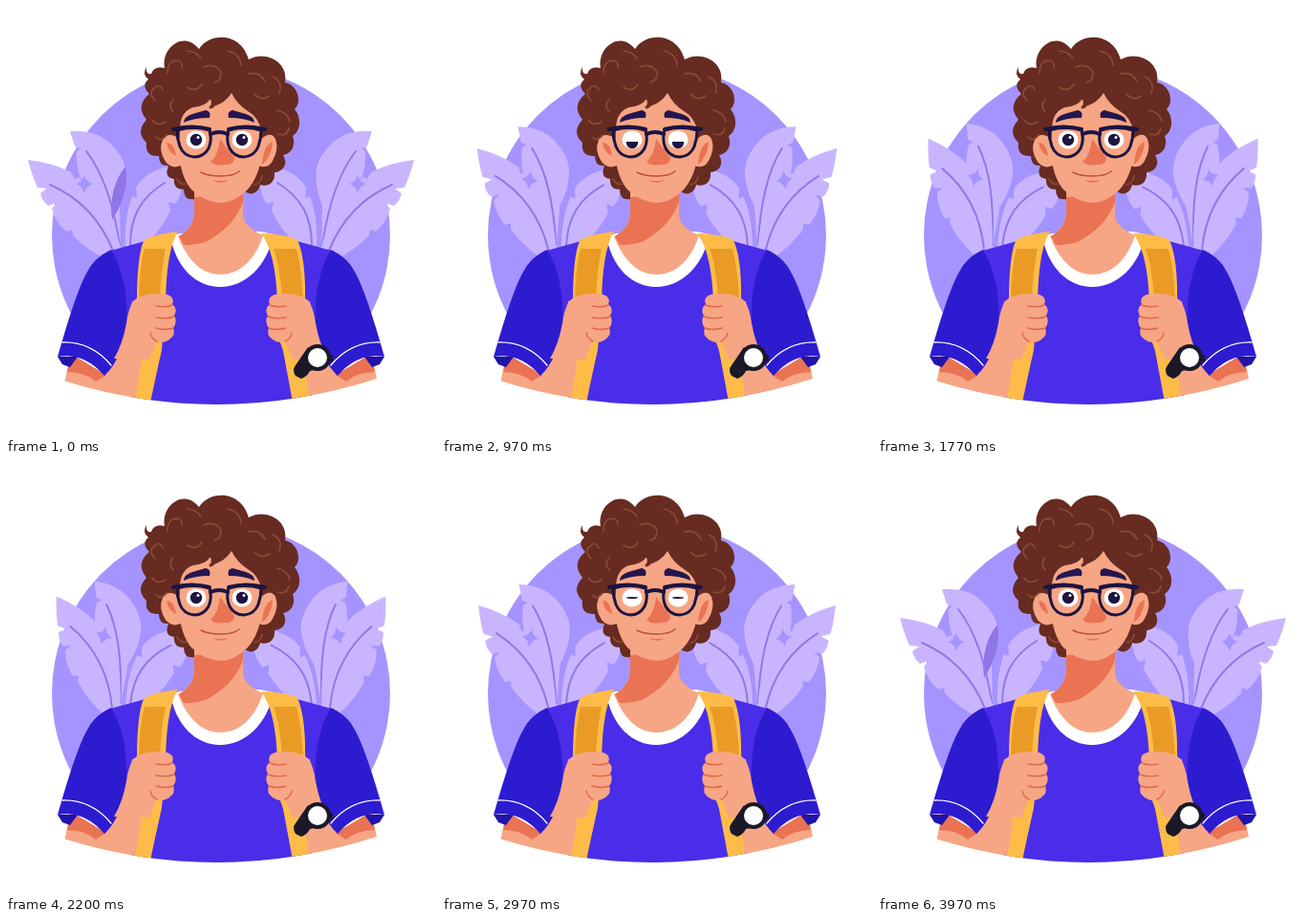
An HTML page that plays this animation: 450 by 450 pixels, repeating every 4000 ms.

```html
<!DOCTYPE html>
<html lang="en">
<head>
<meta charset="utf-8">
<title>Student with backpack</title>
<style>
html, body { margin: 0; width: 100%; height: 100%; overflow: hidden; background: #fff; }
svg { display: block; width: 100vw; height: 100vh; }
.line { fill: none; stroke-linecap: round; stroke-linejoin: round; }
.frond { fill: #c9b5ff; }
.stem { stroke: #9377ea; stroke-width: 2; }
.crease { stroke: #e2684b; stroke-width: 1.5; }
.curl { stroke: #8b4b36; stroke-width: 1.6; }
.hair { fill: #672b21; }
.skin { fill: #f6a684; }
.shade { fill: #ea7354; }
.sleeve { fill: #2d1bd0; }
.strap { fill: #fdbc48; }
.panel { fill: #e99b25; }
.ink { fill: #1c1442; }
</style>
</head>
<body>
<svg viewBox="0 0 450 450">
  <defs>
    <clipPath id="base"><path d="M0 0H450V390H388Q223 443 60 392H0Z"/></clipPath>
    <clipPath id="look"><rect id="lid" x="170" y="120" width="110" height="40"/></clipPath>
    <g id="plant">
      <g class="leaf" data-x="124" data-y="252" data-turn="6">
        <path class="frond" d="M126 264Q122 225 132 199L137 201L136 190Q146 173 170 168L184 184Q184 199 177 207L170 205L172 214Q164 232 148 248Z"/>
        <path class="line stem" d="M130 250C130 222 140 201 166 185"/>
      </g>
      <g class="leaf" data-x="120" data-y="252" data-turn="12">
        <path class="frond" d="M67 131Q92 129 107 142Q122 155 125 170Q127 190 119 209L120 260L108 236Q85 212 78 186L86 182L78 180Q73 167 74 152L78 149L72 147Z"/>
        <path class="curlback" fill="#9075e6" d="M125 168Q130 194 111 224Q107 190 125 168Z"/>
        <path class="line stem" d="M84 152Q109 184 119 250"/>
      </g>
      <g class="leaf" data-x="115" data-y="252" data-turn="17">
        <path class="frond" d="M23 161Q49 164 68 174L72 181L76 179Q97 197 106 215L103 219L109 219Q117 238 122 262L105 265Q84 255 70 240L69 234L63 236Q51 225 48 212L53 206L44 209Q37 203 36 196L43 191L33 190Q27 177 23 161Z"/>
        <path class="line stem" d="M46 187C76 200 99 224 112 256"/>
        <path fill="#a594ff" d="M82 176Q83 184 91 186Q84 188 82 196Q80 188 73 186Q81 184 82 176Z"/>
      </g>
    </g>
    <path id="brow" fill="#251650" d="M186 122Q186 116 195 113L209 109Q215 110 213 117Q197 117 186 122Z"/>
    <g id="sleeve">
      <path class="skin" d="M67 366L60 400L138 418L164 350L166 306L132 309Q128 345 112 370L100 388Z"/>
      <path class="shade" d="M68 364L64 383Q82 383 94 393L105 386Z"/>
      <path fill="#2012aa" d="M54 367L59 375L67 378L75 367Z"/>
      <path class="sleeve" d="M110 255Q91 264 84 280Q73 300 54 367Q82 362 103 387Q122 369 126 332Q128 285 110 255Z"/>
      <path class="line" stroke="#fff" stroke-width="1.3" d="M59 352Q89 351 110 376"/>
    </g>
    <g id="fist">
      <path class="skin" d="M133 309Q145 298 169 302Q177 305 174 312Q180 317 176 324Q180 330 175 337Q178 344 171 349Q164 354 158 351L150 370L113 369Q122 354 126 332Q128 317 133 309Z"/>
      <path class="line crease" d="M174 313Q167 316 157 314M176 325Q168 328 157 326M175 337Q167 340 157 337M158 351Q152 348 151 342"/>
    </g>
  </defs>

  <circle cx="225" cy="240" r="177" fill="#a594ff" clip-path="url(#base)"/>
  <g id="left"></g>
  <g id="right" transform="matrix(-1 0 0 1 450 0)"></g>

  <path class="hair" d="M197 202Q186 204 186 192Q175 192 176 181Q165 180 170 167Q160 168 160 157Q145 158 147 143Q135 132 147 119Q135 104 150 92Q141 83 149 77Q142 71 147 64Q146 72 152 71Q155 62 166 65C162 44 186 25 202 45C213 27 246 27 254 56C272 46 296 59 292 80C306 83 310 101 302 108C310 118 308 131 300 136C304 148 297 155 290 156C296 166 289 174 281 174C282 185 274 190 266 187C264 196 256 199 250 194Z"/>

  <g clip-path="url(#base)">
    <path fill="#4a2de8" d="M174 238L142 247L106 257L112 285L122 350L134 425H318L328 350L338 285L344 257L308 247L273 238Z"/>
    <use href="#sleeve"/>
    <use href="#sleeve" transform="matrix(-1 0 0 1 450 0)"/>

    <path fill="#fff" d="M181 238L172 241C178 274 199 294 224 294C250 294 273 273 280 239L266 236Z"/>
    <path class="skin" d="M197 190V216Q196 233 180 241C190 267 206 281 224 281C243 281 260 268 269 240Q250 232 248 220V188Z"/>
    <path class="shade" d="M197 200L248 196V205Q239 231 209 247Q197 251 186 250L181 241Q197 232 197 215Z"/>

    <path class="strap" d="M144 246Q149 240 180 236Q168 255 167 310L163 360Q157 386 149 425H133L141 376L137 310Q137 262 144 246Z"/>
    <path class="panel" d="M145 254H167Q162 278 161 308H139Q140 272 145 254Z"/>
    <path class="strap" d="M267 238Q295 239 305 245Q314 265 313 310L310 352L318 420H301L288 350L284 310Q282 257 267 238Z"/>
    <path class="panel" d="M280 254H304Q310 278 311 308H289Q287 272 280 254Z"/>
  </g>

  <use href="#fist"/>
  <use href="#fist" transform="matrix(-1 0 0 1 450 0)"/>

  <path fill="#1b1928" d="M316 357L303 376Q299 381 303 387L309 390Q315 388 318 382L332 379Z"/>
  <rect x="338" y="365" width="4" height="7" rx="1.5" fill="#1b1928"/>
  <circle cx="326" cy="368" r="12" fill="#fff" stroke="#1b1928" stroke-width="4"/>

  <path class="skin" d="M183 140Q170 130 164 140Q159 151 167 163Q174 172 185 166ZM266 140Q277 130 282 139Q286 150 279 162Q274 171 264 167Z"/>
  <path class="shade" d="M168 143Q176 143 178 157Q170 154 168 143ZM279 142Q269 146 268 166Q278 158 279 142Z"/>
  <path class="skin" d="M182 130C182 116 187 109 196 106Q209 105 214 97Q216 102 213 106Q229 103 236 91Q242 103 253 110Q264 116 267 130L268 151Q266 178 252 193Q238 206 225 206Q207 205 194 192Q183 179 181 154Z"/>
  <path class="line" stroke="#672b21" stroke-width="3" d="M206 98Q216 94 218 100Q218 105 214 106"/>

  <path class="line curl" d="M156 99Q148 91 156 85Q161 81 164 88M169 70Q169 57 179 57Q185 58 184 64M190 85Q199 91 205 82M207 64Q218 59 225 69Q226 78 218 80M232 47Q245 50 246 62M254 71Q266 68 271 79M260 92Q267 100 276 94M279 74Q290 79 286 91M284 109Q295 112 297 121M284 134Q294 137 296 128M153 119Q158 127 167 121M157 137Q162 143 168 135M179 181Q183 188 189 186M268 178Q267 186 260 187M190 47Q200 48 204 55M175 98Q169 104 175 111"/>

  <use href="#brow"/>
  <use href="#brow" transform="matrix(-1 0 0 1 446 0)"/>
  <path class="shade" d="M224 139Q232 150 239 159Q239 167 228 166Q219 168 214 163Q222 157 224 139Z"/>
  <path class="line" stroke="#c04f38" stroke-width="1.5" d="M204 174Q211 178 225 178Q238 178 244 173"/>
  <path class="shade" d="M216 182Q225 184 233 182Q225 188 216 182Z"/>

  <g fill="#fff"><ellipse cx="199" cy="140" rx="10.5" ry="9.5"/><ellipse cx="247" cy="140" rx="10.5" ry="9.5"/></g>
  <g clip-path="url(#look)">
    <g id="pupils" class="ink">
      <circle cx="199" cy="140" r="6.2"/><circle cx="247" cy="140" r="6.2"/>
      <g fill="#fff"><circle cx="201" cy="137.5" r="1.5"/><circle cx="249" cy="137.5" r="1.5"/></g>
    </g>
  </g>

  <g class="line" stroke="#1c1442" stroke-width="3">
    <path id="lens" d="M179 130Q197 125 213 130Q216 140 212 149Q207 158 197 158Q186 157 182 147Q179 139 179 130Z"/>
    <use href="#lens" transform="matrix(-1 0 0 1 446 0)"/>
    <path d="M214 134Q223 130 232 134M175 129Q195 124 213 129M271 129Q251 124 233 129" stroke-width="4"/>
  </g>
</svg>
<script>
const $ = id => document.getElementById(id);
const LOOP = 4000;

for (const side of ['left', 'right']) {
  const plant = $('plant').cloneNode(true);
  plant.removeAttribute('id');
  $(side).append(plant);
}
$('right').querySelector('.curlback').remove();

const leaves = [...document.querySelectorAll('#left .leaf, #right .leaf')];
const curlback = $('left').querySelector('.curlback');

const pulse = (t, mid, half) => Math.min(1, 1.3 * Math.max(0, 1 - Math.abs(t - mid) / half));

function draw(t) {
  const sway = (1 - Math.cos(2 * Math.PI * t / LOOP)) / 2;
  for (const leaf of leaves) {
    const { x, y, turn } = leaf.dataset;
    leaf.setAttribute('transform', `rotate(${turn * sway} ${x} ${y})`);
  }
  curlback.setAttribute('opacity', Math.max(0, Math.min(1, 2 - 5 * sway)));

  // Two blinks: one glances down, the other squeezes shut.
  const down = pulse(t, 1000, 150);
  const shut = pulse(t, 3000, 150);
  $('lid').setAttribute('y', 120 + 22 * down);
  $('pupils').setAttribute('transform',
    `translate(0 ${140 + 3 * down}) scale(1 ${1 - 0.85 * shut}) translate(0 -140)`);
}

function tick() {
  draw(performance.now() % LOOP);
  requestAnimationFrame(tick);
}
tick();
</script>
</body>
</html>
```
